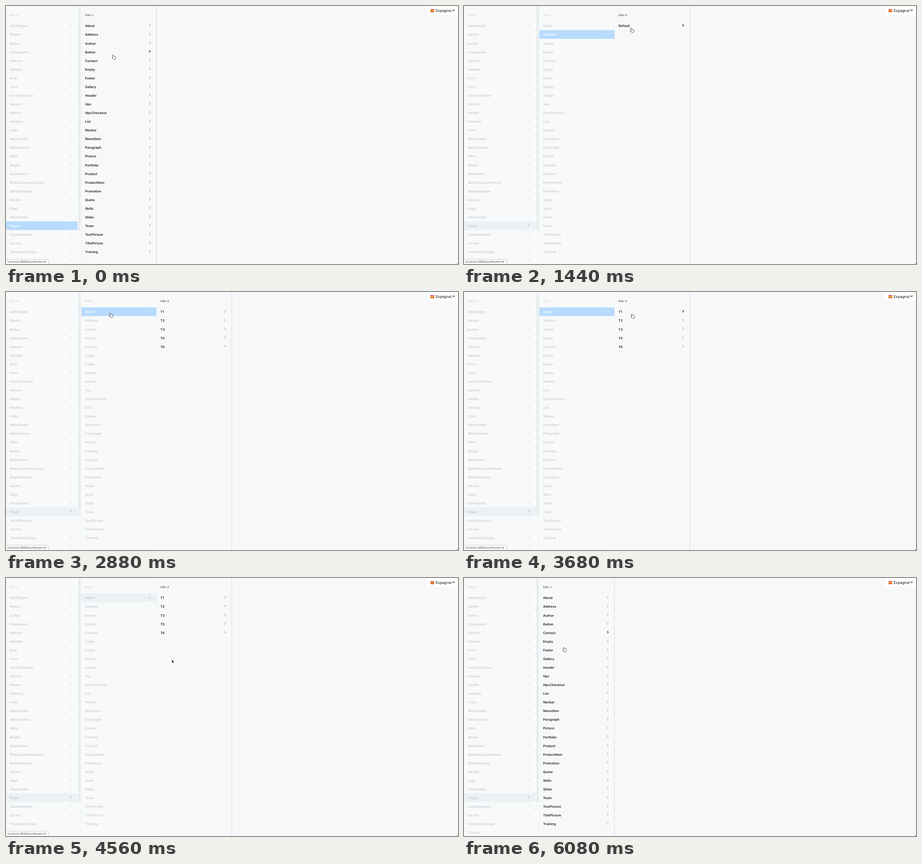
An HTML page that plays this animation: 990x566 px, repeating every 6.16 s.

```html
<!DOCTYPE html>
<html lang="en">
<head>
<meta charset="utf-8">
<title>Column browser</title>
<style>
  html, body { margin: 0; width: 100%; height: 100%; overflow: hidden; background: #f6f8fa; }
  svg { display: block; width: 990px; height: 566px; }
  text { font-family: Inter, "Open Sans", sans-serif; font-size: 7.15px; font-weight: 600; text-rendering: geometricPrecision; white-space: pre; }
  .head { font-size: 5.6px; letter-spacing: .35px; }
  .lang { font-size: 8.1px; font-weight: 400; }
  .status { font: 5.9px "DejaVu Sans", sans-serif; }
</style>
</head>
<body>
<svg id="stage" viewBox="0 0 990 566">
  <g id="columns"></g>
  <g id="language">
    <rect x="922.5" width="67.5" height="19.5" fill="#fff"/>
    <path d="M930 7.3q2-.8 4 0t4-.3v6q-2 .8-4 .2t-4.400.2z" fill="#c8102e"/>
    <path d="M930 8.900q2-.8 4 0t4-.3v2.900q-2 .8-4 .2t-4.200.2z" fill="#f7c325"/>
    <text class="lang" x="941" y="13" fill="#111">Espagnol</text>
    <path d="M978 8.300h5.200l-2.600 2.800z" fill="#222"/>
  </g>
  <g id="status">
    <path d="M-1 567V555.700H91q2.300 0 2.300 2.300V567z" fill="#fff" stroke="#b9bcbf" stroke-width=".8"/>
    <text class="status" x="2.500" y="563" fill="#4a4d50">localhost:8888/JsonReader/#</text>
  </g>
  <path d="M990 563.500V566H987.500Q989.500 565.500 990 563.500z" fill="#222"/>
  <g id="cursor" stroke-linejoin="round">
    <path id="hand" fill="#fff" stroke="#222" stroke-width=".8" d="M-2.200-4.600q1-.5 1.400.5l.7 2.400q1-.6 1.500.2q1-.5 1.400.3q1.200-.2 1.300.9l.2 2q0 1.600-.9 3l-4 .5q-1.600-2-3.200-3.200q-.4-1.200 1.300-.6l.8.4l-1.300-5q-.1-1 .8-1.400z"/>
    <path id="arrow" fill="#111" stroke="#fff" stroke-width=".6" d="M-1.700-4.200v7.400l1.800-1.600 1.200 2.700 1.200-.6-1.200-2.500h2.300z"/>
  </g>
</svg>
<script>
const LOOP = 6160, STEP = 80;
const COL = 165, TOP = 34.2, PITCH = 19.07, FIELD = 38.7;
const $ = id => document.getElementById(id);
const words = s => s.split(' ');

const widgets = words('AddWidget Banner Button Component EditIcon Editable Error Form FormValidation Generic Header Heading Links MainLoader Maintenance Meta Modal ModalAlert ModalCustomDomain ModalManage Navbar Page Placeholder Plugin SocialNetwork Survey TemplateChange Toaster');
const plugins = words('About Address Author Button Contact Empty Footer Gallery Header Hpc HpcCheckout List Navbar NewsItem Paragraph Picture Portfolio Product ProductItem Promotion Quote Skills Slider Team TextPicture TitlePicture Training');
const addressFields = [
  ['City', 'París, Francia'],
  ['PhoneNumber', '+00 (0)8 17 26 35 40'],
  ['Street', '8 Avenue Belmire Troune'],
  ['ZipCode', '00482']
];

const base = [widgets, plugins];
const address = [...base, ['Default']];
const about = [...base, words('T1 T2 T3 T5 T6')];

// Each scene lists its open columns and the chosen row in every column but the last.
const scenes = [
  { at: 0, lists: base, chosen: [23], focus: true },
  { at: 720, lists: address, chosen: [23, 1], focus: true },
  { at: 1680, lists: [...address, ['Location']], chosen: [23, 1, 0], focus: true, fields: addressFields },
  { at: 2480, lists: about, chosen: [23, 0], focus: true },
  { at: 3760, lists: [...about, []], chosen: [23, 0, 0], focus: true },
  { at: 4400, lists: about, chosen: [23, 0] },
  { at: 5280, lists: base, chosen: [23] }
];

// time, x, y
const track = [
  [0, 236, 112], [560, 235, 69], [800, 235, 69], [1280, 366, 55], [1440, 368, 53],
  [1760, 368, 53], [2240, 236, 51], [2320, 230, 51], [2960, 230, 51], [3520, 369.5, 53],
  [3840, 369.5, 53], [4320, 365, 183], [4880, 365, 183], [5280, 221, 22], [5600, 221, 22],
  [6080, 220, 157]
];

function pointer(t) {
  const i = track.findIndex(k => k[0] > t);
  if (i < 0) return track[track.length - 1].slice(1);
  const [t0, x0, y0] = track[i - 1], [t1, x1, y1] = track[i];
  const p = (t - t0) / (t1 - t0);
  return [x0 + (x1 - x0) * p, y0 + (y1 - y0) * p];
}

function rowUnder([x, y], lists) {
  const col = Math.floor(x / COL), row = Math.floor((y - 5 - TOP) / PITCH);
  return lists[col] && lists[col][row] ? { col, row } : null;
}

const rect = (x, y, w, h, fill) => `<rect x="${x}" y="${y}" width="${w}" height="${h}" fill="${fill}"/>`;
const label = (x, y, fill, s, cls = '') => `<text class="${cls}" x="${x}" y="${y}" fill="${fill}">${s}</text>`;

function rowMarkup(name, col, row, look) {
  const x = col * COL, y = TOP + row * PITCH;
  const width = col ? COL - .5 : 157;
  const back = look.back ? rect(x, y - .3, width, PITCH - .1, look.back) : '';
  const tip = x + (col ? 148.6 : 140.8);
  return back + label(x + 8.2, y + 12.2, look.text, name) +
    `<path d="M${tip} ${y + 5.8}l2.500 2.500-2.500 2.500" fill="none" stroke="${look.mark}" stroke-width="${look.bold ? 1.1 : .75}"/>`;
}

function rowLook(open, chosen, focused, hovered) {
  if (open) return { text: '#1d1f21', mark: hovered ? '#111' : '#5c6064', bold: hovered };
  if (chosen && focused) return { text: '#f4faff', mark: '#fff', back: '#b8dbfd' };
  if (chosen) return { text: '#c3cacc', mark: '#838a8c', back: '#eaf2f3' };
  return { text: hovered ? '#bfc3c5' : '#cbced1', mark: hovered ? '#777b7e' : '#c3c6c9' };
}

function fieldMarkup([name, value], x, i) {
  const y = TOP + PITCH + i * FIELD;
  return rect(x, y, COL - .5, FIELD, '#fff') + rect(x, y + FIELD - .9, COL - .5, .9, '#d5d9dd') +
    label(x + 8.2, y + 12.3, '#0878c9', name) + label(x + 8.2, y + 31.3, '#1d1f21', value);
}

function columnsMarkup({ lists, chosen, focus, fields = [] }, hover) {
  const last = lists.length - 1;
  return lists.map((list, col) => {
    const x = col * COL, open = col === last;
    const rows = list.map((name, row) => rowMarkup(name, col, row, rowLook(
      open, chosen[col] === row, focus && col === last - 1,
      !!hover && hover.col === col && hover.row === row)));
    return (open ? '' : rect(x, 0, COL, 566, '#f7f9fa')) +
      rect(x + COL - .8, 0, .9, 566, open ? '#d3d8dc' : '#edf0f2') +
      (col ? '' : `<rect x="158.800" y="1.500" width="4.400" height="490.500" rx="1" fill="#e6ebed"/>`) +
      label(x + 8.2, 22, open ? '#3a3e42' : '#cbcfd2', 'COL-' + col, 'head') +
      rows.join('') +
      (open ? fields.map((f, i) => fieldMarkup(f, x, i)).join('') : '');
  }).join('');
}

function draw(t) {
  const scene = scenes.filter(s => s.at <= t).pop();
  const at = pointer(t);
  const hover = rowUnder(pointer(Math.max(0, t - STEP)), scene.lists);
  const pointing = !!rowUnder(at, scene.lists);
  $('columns').innerHTML = columnsMarkup(scene, hover);
  $('status').setAttribute('visibility', t < 4720 ? 'visible' : 'hidden');
  $('cursor').setAttribute('transform', `translate(${at})`);
  $('hand').setAttribute('visibility', pointing ? 'visible' : 'hidden');
  $('arrow').setAttribute('visibility', pointing ? 'hidden' : 'visible');
}

const start = performance.now();
let shown = -1;
function tick() {
  const t = Math.floor((performance.now() - start) % LOOP / STEP) * STEP;
  if (t !== shown) draw(shown = t);
  requestAnimationFrame(tick);
}
tick();
</script>
</body>
</html>
```
